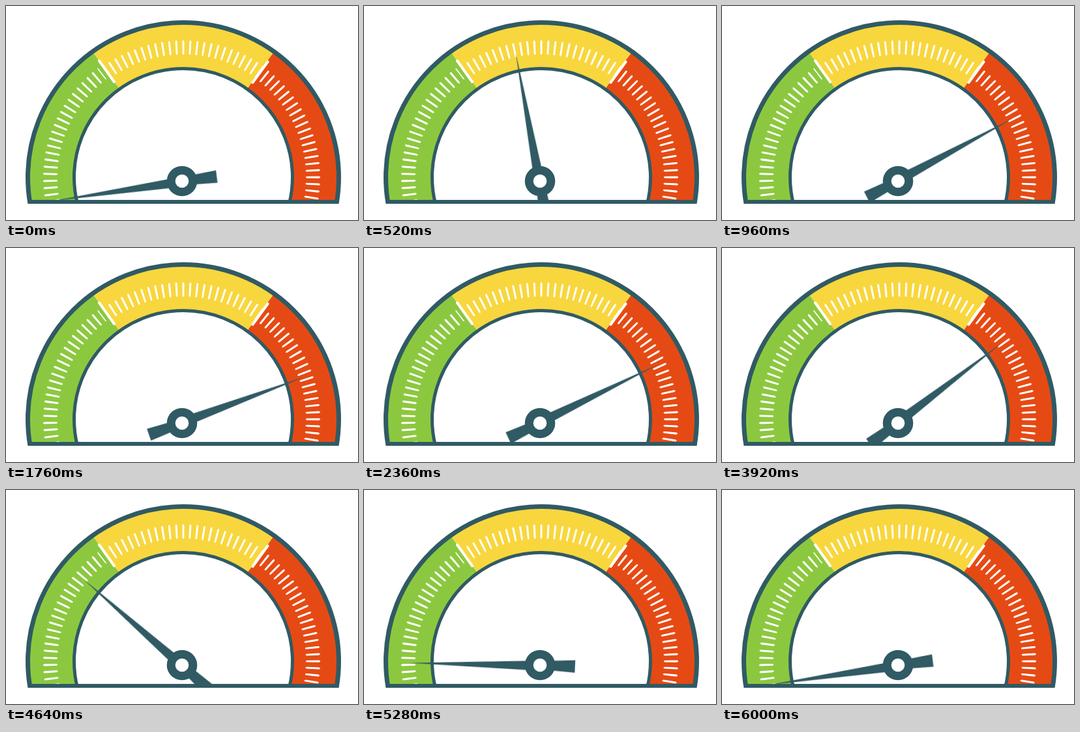
Write an HTML page without scripts that moves like this. It is 540x330 px and loops after 6.04 s.

```html
<!DOCTYPE html>
<html lang="en">
<head>
<meta charset="utf-8">
<title>Gauge</title>
<style>
  html, body { margin: 0; width: 100%; height: 100%; overflow: hidden; background: #fff; }
  svg { display: block; width: 540px; height: 330px; }
  .band, .frame, .ticks { fill: none; }
  .band { stroke-width: 71; }
  .frame { stroke: #305a64; }
  .ticks { stroke: #fff; }
  /* two layers give each tick softly rounded ends */
  .body { stroke-width: 19.5; stroke-dasharray: .28 .72; stroke-dashoffset: .14; }
  .ends { stroke-width: 22; stroke-dasharray: .18 .82; stroke-dashoffset: .09; }
  .hand { fill: #305a64; }
  .needle { animation: swing 6.04s infinite; }

  @keyframes swing {
    0% { transform: rotate(-8.7deg); animation-timing-function: cubic-bezier(.4, 0, .6, .95); }
    15.894% { transform: rotate(151.3deg); animation-timing-function: cubic-bezier(.3, .6, .6, 1); }
    29.139% { transform: rotate(159.3deg); animation-timing-function: cubic-bezier(.4, 0, .6, .9); }
    49.669% { transform: rotate(146.2deg); animation-timing-function: cubic-bezier(.3, .4, .6, .9); }
    64.901% { transform: rotate(142.3deg); animation-timing-function: cubic-bezier(.45, 0, .7, .75); }
    76.821% { transform: rotate(41.4deg); animation-timing-function: cubic-bezier(.2, .6, .5, 1); }
    99.338%, 100% { transform: rotate(-8.7deg); }
  }
</style>
</head>
<body>
<svg viewBox="0 0 540 330">
  <defs>
    <clipPath id="above"><rect width="540" height="305"/></clipPath>
    <g id="scale">
      <path pathLength="21.4" d="M147.6 104.3A202 202 0 0 0 72.1 305.3"/>
      <path pathLength="24" d="M155.3 101.6A200 200 0 0 1 388.7 101.6"/>
      <path pathLength="22" d="M388.1 102.4A199 199 0 0 1 466.6 305.7"/>
    </g>
  </defs>

  <g clip-path="url(#above)">
    <g class="band">
      <path stroke="#8cc83f" d="M74.9 305.9A201.5 201.5 0 0 1 154.4 100.4"/>
      <path stroke="#e64a14" d="M389.6 100.4A201.5 201.5 0 0 1 469.1 305.9"/>
      <path stroke="#f8d63e" d="M154.4 100.4A201.5 201.5 0 0 1 389.6 100.4"/>
    </g>

    <g class="ticks">
      <use href="#scale" class="body"/>
      <use href="#scale" class="ends"/>
      <path stroke-width="4" d="M143 84.5L166 117M401.6 86L378.4 118" stroke-linecap="round"/>
    </g>

    <g class="frame">
      <circle cx="272" cy="264" r="238.5" stroke-width="7"/>
      <circle cx="272" cy="264" r="167.5" stroke-width="5"/>
      <line stroke-width="6" x1="34" y1="302" x2="510" y2="302"/>
    </g>

    <g class="hand" transform="translate(270 270)">
      <path class="needle" d="M-201 .3L-18 -6.3L18 -7L54 -8.6L53.5 10.8L18 8L-18 8Z"/>
      <circle r="23.3"/>
      <circle r="10.3" fill="#fff"/>
    </g>
  </g>
</svg>
</body>
</html>
```
